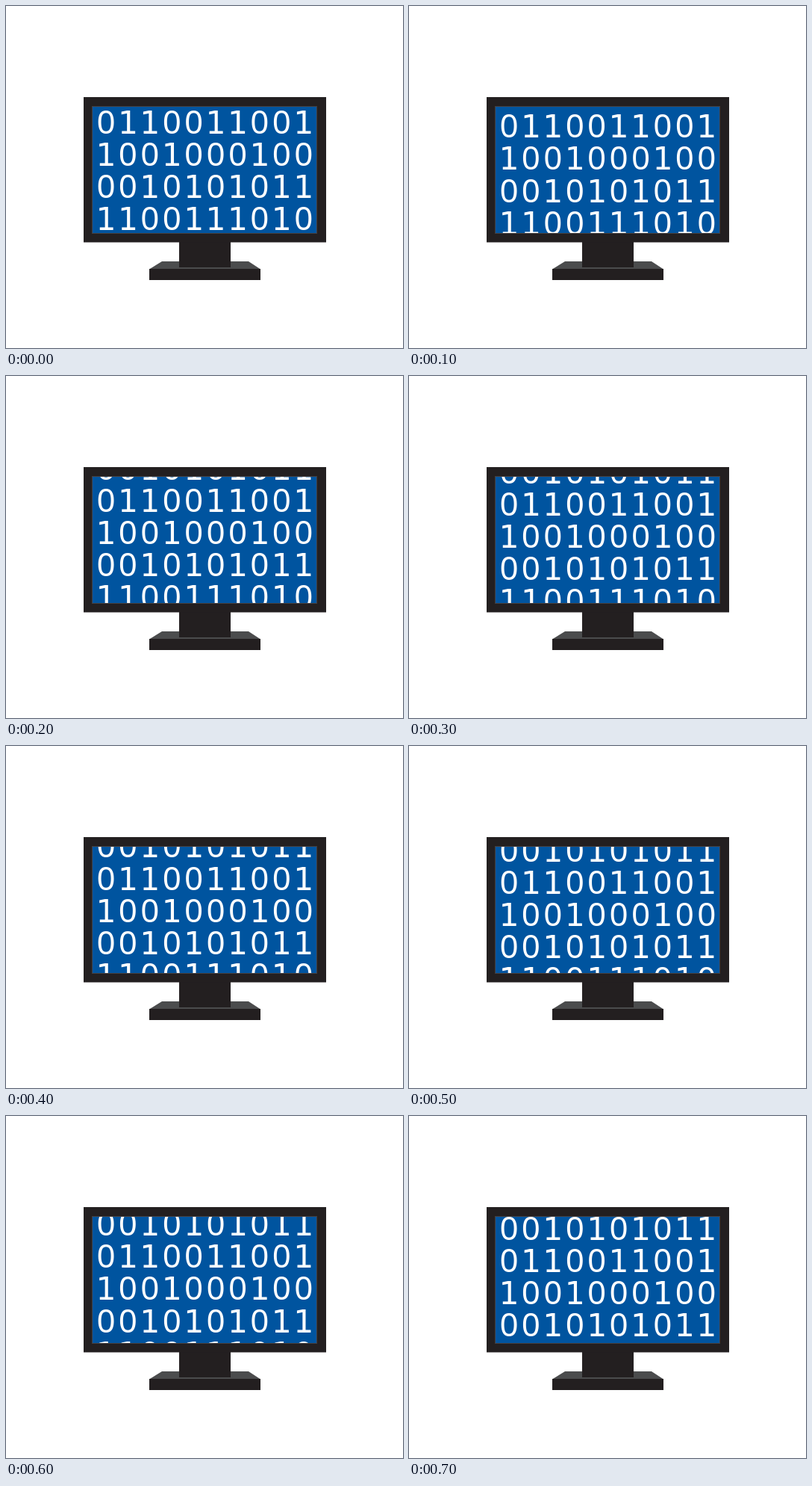
These frames come from a looping animation (532 by 458 pixels, 800 ms). An HTML page with a canvas:

```html
<!DOCTYPE html>
<html lang="en">
<head>
<meta charset="utf-8">
<title>Binary monitor</title>
<style>
  html, body { margin: 0; width: 100%; height: 100%; overflow: hidden; background: #fff; }
  canvas { display: block; }
</style>
</head>
<body>
<canvas id="stage" width="532" height="458"></canvas>
<script>
const ctx = document.getElementById('stage').getContext('2d');

const LOOP = 800, STEPS = 8;
const ROW_H = 43.1, COL_W = 29.42;
const FIRST_X = 134, BASELINE = 171;
const ROWS = ['0010101011', '0110011001', '1001000100', '0010101011', '1100111010'];
const SCREEN = [116, 135, 301, 169];
const DARK = '#231f20';

// A narrow zero and a slab-footed one
const FONTS = {
  0: '44px "Noto Sans", "Open Sans", sans-serif',
  1: '42.5px "DejaVu Sans", sans-serif'
};

function box(color, x, y, w, h) {
  ctx.fillStyle = color;
  ctx.fillRect(x, y, w, h);
}

function poly(color, points) {
  ctx.fillStyle = color;
  ctx.beginPath();
  for (const [x, y] of points) ctx.lineTo(x, y);
  ctx.fill();
}

function drawMonitor() {
  box('#fff', 0, 0, 532, 458);
  poly('#4b4c4d', [[209, 342], [325, 342], [341, 352.5], [192, 352.5]]);
  box(DARK, 192, 352, 149, 15);
  box(DARK, 232, 315, 69, 35);
  box(DARK, 104, 122, 325, 194.5);
  box('#00549f', ...SCREEN);
  ctx.strokeStyle = '#46403f';
  ctx.lineWidth = 1;
  ctx.strokeRect(115.5, 134.5, 301, 170);
}

function drawDigits(shift) {
  ctx.save();
  ctx.beginPath();
  ctx.rect(...SCREEN);
  ctx.clip();
  ctx.fillStyle = '#fff';
  ctx.textAlign = 'center';
  ctx.textBaseline = 'alphabetic';
  ROWS.forEach((row, r) => {
    const y = BASELINE + (r - 1) * ROW_H + shift;
    [...row].forEach((digit, c) => {
      ctx.font = FONTS[digit];
      ctx.fillText(digit, FIRST_X + c * COL_W, y);
    });
  });
  ctx.restore();
}

function frame() {
  const step = Math.floor((performance.now() % LOOP) / LOOP * STEPS);
  drawMonitor();
  drawDigits(step / STEPS * ROW_H);
  requestAnimationFrame(frame);
}

frame();
</script>
</body>
</html>
```
